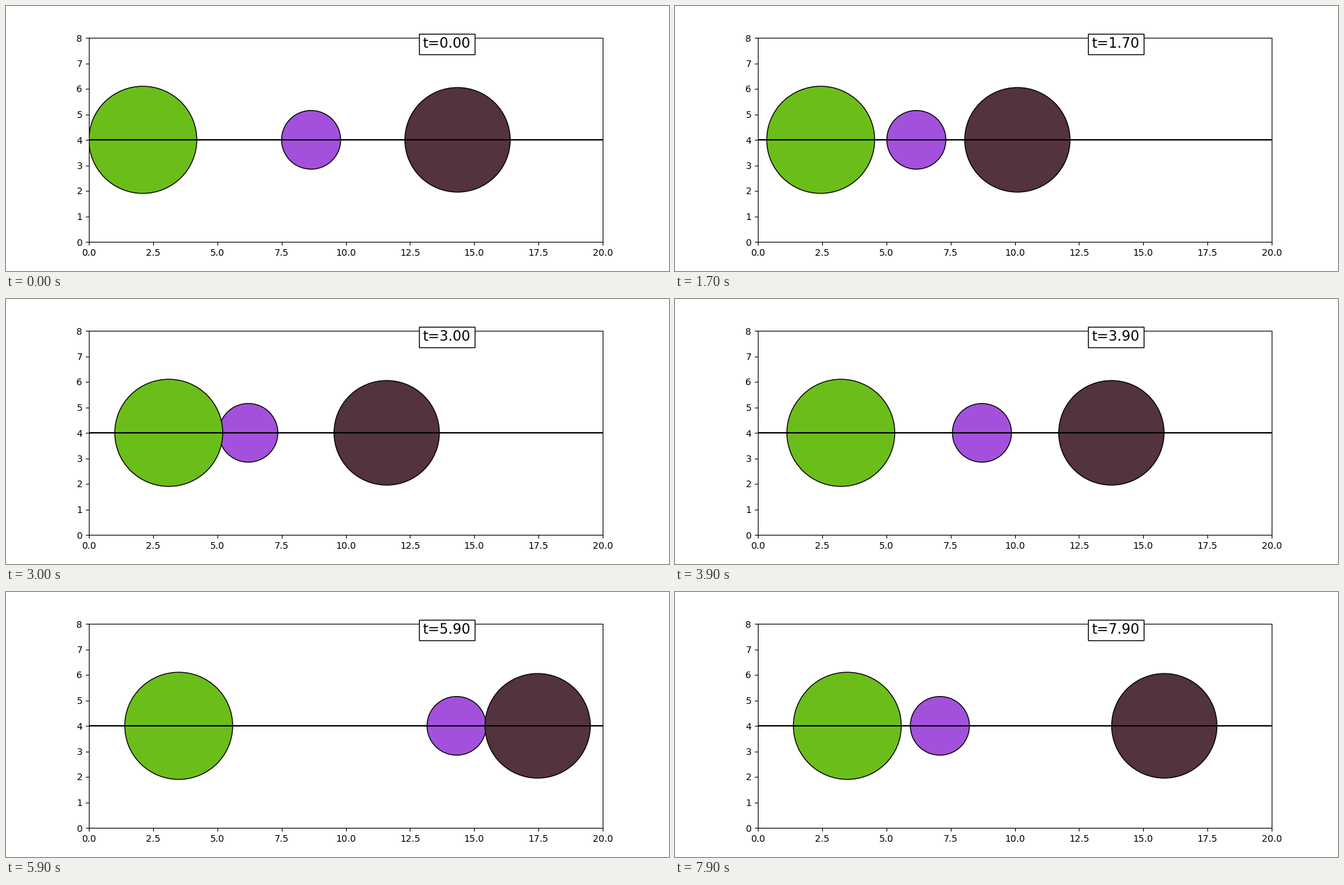
A matplotlib script for the animation above (8000 ms loop, 1000 px wide and 400 px high).

```python
import matplotlib.pyplot as plt
from matplotlib.animation import FuncAnimation
from matplotlib.patches import Circle

WIDTH, HEIGHT, LINE_Y = 20, 8, 4
STEPS, DT = 80, 0.1

RADII = [2.1, 1.15, 2.05]
START = [2.1, 8.65, 14.35]
SPEED = [0.4, -2.6, -2.5]
COLORS = ["#6bbe1a", "#a351dc", "#53333d"]
LAYERS = [1.2, 1.0, 1.1]


def bounce(v, a, b):
    """Elastic collision of neighbours; mass is proportional to radius."""
    ma, mb = RADII[a], RADII[b]
    centre = (ma * v[a] + mb * v[b]) / (ma + mb)
    v[a], v[b] = 2 * centre - v[a], 2 * centre - v[b]


def step(x, v):
    x = [p + s * DT for p, s in zip(x, v)]
    v = list(v)
    for i, r in enumerate(RADII):
        if x[i] < r - 1e-9:
            x[i], v[i] = r, abs(v[i])
        elif x[i] > WIDTH - r + 1e-9:
            x[i], v[i] = WIDTH - r, -abs(v[i])
    for a, b in ((0, 1), (1, 2)):
        overlap = RADII[a] + RADII[b] - (x[b] - x[a])
        if overlap > 1e-6 and v[a] > v[b]:
            bounce(v, a, b)
    return x, v


def simulate():
    x, v = START, SPEED
    path = [x]
    for _ in range(STEPS - 1):
        x, v = step(x, v)
        path.append(x)
    return path


path = simulate()

fig, ax = plt.subplots(figsize=(10, 4), dpi=100)
ax.set_xlim(0, WIDTH)
ax.set_ylim(0, HEIGHT)
ax.plot([0, WIDTH], [LINE_Y, LINE_Y], color="black", lw=1.5)

balls = [
    ax.add_patch(Circle((x, LINE_Y), r, facecolor=c, edgecolor="black", lw=1, zorder=z))
    for x, r, c, z in zip(START, RADII, COLORS, LAYERS)
]
clock = ax.text(13, 7.6, "t=0.00", fontsize=15, bbox=dict(facecolor="white"))


def draw(n):
    for ball, x in zip(balls, path[n]):
        ball.center = (x, LINE_Y)
    clock.set_text(f"t={n * DT:.2f}")
    return [*balls, clock]


anim = FuncAnimation(fig, draw, frames=STEPS, interval=1000 * DT, repeat=True, repeat_delay=0)
plt.show()
```
